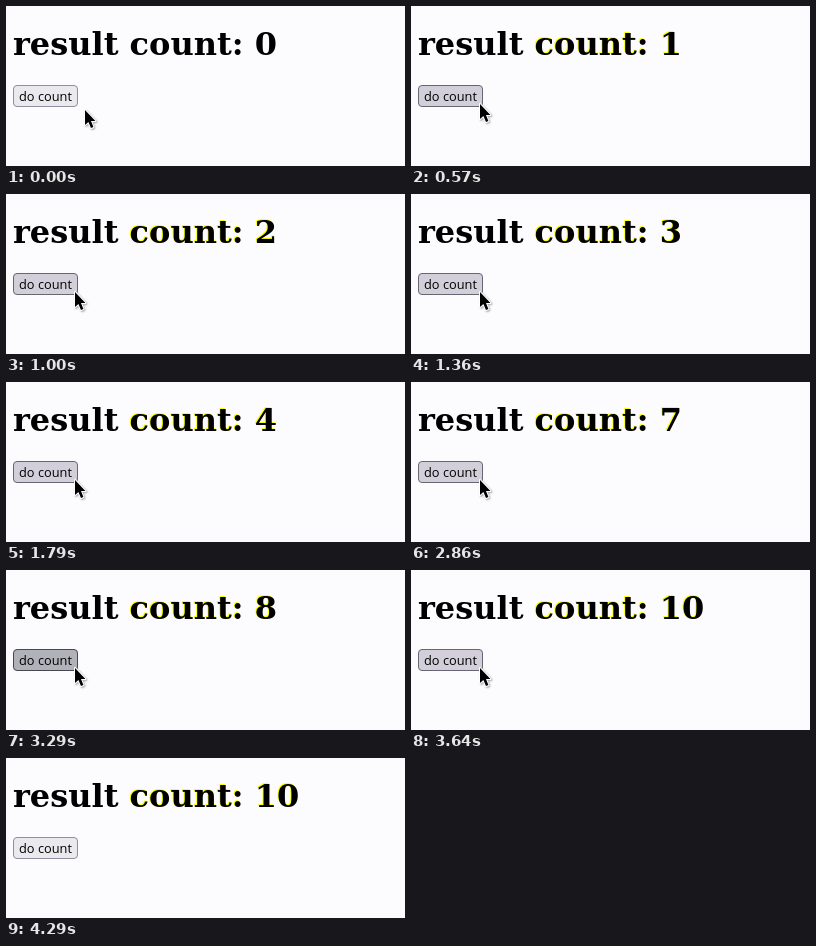
An HTML page with a canvas for the animation above (4.87 s loop, 399x160 px).

```html
<!DOCTYPE html>
<html lang="en">
<head>
<meta charset="utf-8">
<title>Click counter</title>
<style>
  html, body { margin: 0; width: 100%; height: 100%; overflow: hidden; background: #fcfcfe; }
  canvas { display: block; }
</style>
</head>
<body>
<canvas id="stage" width="399" height="160"></canvas>
<script>
const ctx = document.getElementById('stage').getContext('2d');
const LOOP = 4870;
const STEP = 71.4;
const PRESS = 140;
const releases = [500, 1000, 1290, 1640, 2000, 2500, 2790, 3070, 3350, 3570];

const button = { x: 7.5, y: 79.5, w: 64, h: 21 };
const looks = {
  normal: { fill: '#e9e9ee', edge: '#8f8f9d' },
  hover: { fill: '#d2cfda', edge: '#676774' },
  active: { fill: '#b1b1b9', edge: '#484851' }
};
const arrow = [[0, 0], [0, 15], [3.4, 12], [6, 18], [8.4, 17], [6, 11], [10.4, 11]];

// Pointer moves in the same coarse steps as a screen recording.
function progress(t, start, length) {
  const p = Math.floor((t - start) / STEP + 1) * STEP / length;
  const c = Math.min(1, Math.max(0, p));
  return c * c * (3 - 2 * c);
}

function pointerAt(t) {
  if (t >= 4288) return null;
  const enter = progress(t, 70, 357);
  const leave = progress(t, 3790, 430);
  return {
    x: 79 - 10 * enter + 11 * leave,
    y: 104 - 6 * enter + 12 * leave
  };
}

function drawHeading(count) {
  const lead = 'result ';
  const rest = 'count: ' + count;
  const left = 7;
  ctx.font = 'bold 32px "DejaVu Serif", serif';
  if (count > 0) {
    ctx.fillStyle = '#ff0';
    ctx.fillText(rest, left - 1 + ctx.measureText(lead).width, 48);
  }
  ctx.fillStyle = '#000';
  ctx.fillText(lead + rest, left, 49);
}

function drawButton(look) {
  ctx.beginPath();
  ctx.roundRect(button.x, button.y, button.w, button.h, 3.5);
  ctx.fillStyle = look.fill;
  ctx.fill();
  ctx.lineWidth = 1;
  ctx.strokeStyle = look.edge;
  ctx.stroke();
  ctx.font = '500 12.8px "Open Sans", "Noto Sans", sans-serif';
  ctx.fillStyle = '#000';
  ctx.fillText('do count', 13, 95);
}

function drawPointer({ x, y }) {
  ctx.beginPath();
  arrow.forEach(([dx, dy]) => ctx.lineTo(x + dx, y + dy));
  ctx.closePath();
  ctx.lineJoin = 'round';
  ctx.lineWidth = 2;
  ctx.strokeStyle = '#fff';
  ctx.shadowColor = 'rgba(0, 0, 0, 0.35)';
  ctx.shadowBlur = 2;
  ctx.shadowOffsetX = ctx.shadowOffsetY = 1;
  ctx.stroke();
  ctx.shadowColor = 'transparent';
  ctx.fillStyle = '#000';
  ctx.fill();
}

function draw(t) {
  const count = releases.filter(r => t >= r).length;
  const pointer = pointerAt(t);
  const pressed = releases.some(r => t >= r - PRESS && t < r);
  const over = pointer && pointer.x <= 72 && pointer.y <= 101;

  ctx.fillStyle = '#fcfcfe';
  ctx.fillRect(0, 0, 399, 160);
  drawHeading(count);
  drawButton(pressed ? looks.active : over ? looks.hover : looks.normal);
  if (pointer) drawPointer(pointer);
}

const began = performance.now();
function tick() {
  draw((performance.now() - began) % LOOP);
  requestAnimationFrame(tick);
}
tick();
</script>
</body>
</html>
```
